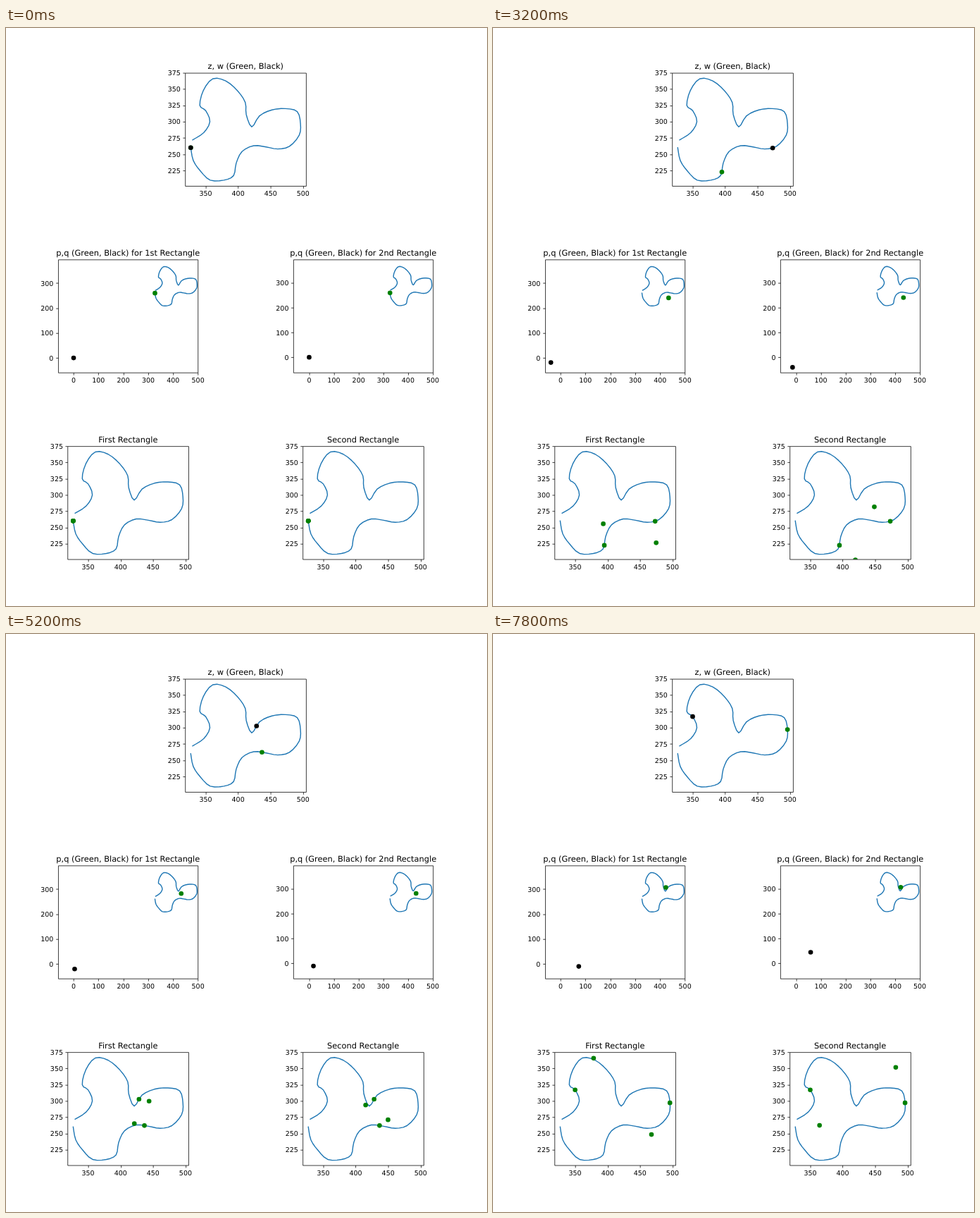
Recreate the animation shown at these times as an HTML page. Size 683x820 px, loop 8000 ms.

```html
<!DOCTYPE html>
<html lang="en">
<head>
<meta charset="utf-8">
<title>Rectangles on a curve</title>
<style>
  html, body { margin: 0; width: 100%; height: 100%; overflow: hidden; background: #fff; }
  svg { display: block; width: 683px; height: 820px; }
  text { font: 10px "DejaVu Sans", sans-serif; text-anchor: middle; text-rendering: geometricPrecision; }
  text.title { font-size: 12px; }
  text.left { text-anchor: end; }
  .axis { fill: none; stroke: #000; stroke-width: .8; }
  .curve { fill: none; stroke: #1f77b4; stroke-width: 1.5; stroke-linejoin: round; stroke-linecap: square; }
</style>
</head>
<body>
<svg id="stage" viewBox="0 0 720 864" preserveAspectRatio="none"></svg>
<script>
const STEP_MS = 200, STEPS = 40;
const GREEN = '#008000', BLACK = '#000';
const stage = document.getElementById('stage');

// Key points of the hand-drawn curve; a spline puts STRIDE steps between neighbours.
const STRIDE = 3;
const keys = [
  [327, 260], [331, 240], [342, 224], [357, 210], [378, 210], [393, 217],
  [397, 236], [406, 254], [424, 263], [443, 261], [461, 258], [479, 262],
  [494, 279], [496, 297], [491, 315.5], [473, 320], [452, 318], [433, 309],
  [421, 292], [412.5, 311], [411, 329.5], [399, 347.5], [381, 362.5], [361, 366],
  [346.5, 348], [341, 325], [350, 317], [356.5, 300], [347, 283], [330, 272]
];

// Catmull-Rom spline, with the end keys repeated.
function pointAt(step) {
  const i = Math.min(Math.floor(step / STRIDE), keys.length - 2), t = step / STRIDE - i;
  const key = j => keys[Math.max(0, Math.min(keys.length - 1, j))];
  return [0, 1].map(axis => {
    const [a, b, c, d] = [-1, 0, 1, 2].map(j => key(i + j)[axis]);
    return b + t / 2 * (c - a + t * (2 * a - 5 * b + 4 * c - d + t * (3 * (b - c) + d - a)));
  });
}
const points = Array.from({ length: (keys.length - 1) * STRIDE + 1 }, (_, k) => pointAt(k));

function add(parent, tag, attrs, text) {
  const el = document.createElementNS('http://www.w3.org/2000/svg', tag);
  for (const key in attrs) el.setAttribute(key, attrs[key]);
  if (text !== undefined) el.textContent = text;
  parent.appendChild(el);
  return el;
}

const range = (from, to, step) =>
  Array.from({ length: (to - from) / step + 1 }, (_, i) => from + i * step);
const snap = v => Math.round(v) + .5;

const HEIGHT = 168.9;
const rowTop = row => 67.2 + 279 * row;

// ox, oy: position of the data origin. Returns a function that places the dots.
function panel({ title, left, top, width, scale, ox, oy, xTicks, yTicks, colors }) {
  const right = left + width, bottom = top + HEIGHT;
  const X = x => ox + x * scale, Y = y => oy - y * scale;
  const id = 'clip' + stage.childElementCount;
  add(add(stage, 'clipPath', { id }), 'rect', { x: left, y: top, width, height: HEIGHT });

  const plot = add(stage, 'g', { 'clip-path': `url(#${id})` });
  add(plot, 'polyline', { class: 'curve', points: points.map(([x, y]) => [X(x), Y(y)]).join(' ') });
  const dots = colors.map(fill => add(plot, 'circle', { r: 3.5, fill }));

  const l = snap(left), r = snap(right), t = snap(top), b = snap(bottom);
  let d = `M${l} ${t}H${r}V${b}H${l}Z`;
  for (const x of xTicks) {
    d += `M${snap(X(x))} ${b}v3.5`;
    add(stage, 'text', { x: X(x), y: bottom + 14.6 }, x);
  }
  for (const y of yTicks) {
    d += `M${l} ${snap(Y(y))}h-3.5`;
    add(stage, 'text', { class: 'left', x: left - 7, y: Y(y) + 3.8 }, y);
  }
  add(stage, 'path', { class: 'axis', d });
  add(stage, 'text', { class: 'title', x: left + width / 2, y: top - 6 }, title);

  return positions => positions.forEach(([x, y], i) => {
    dots[i].setAttribute('cx', X(x));
    dots[i].setAttribute('cy', Y(y));
  });
}

function closeUp(title, left, row, colors) {
  const scale = .972, top = rowTop(row);
  return panel({
    title, left, top, colors, scale, width: 180.7,
    ox: left - 318.55 * scale, oy: top + HEIGHT + 201.1 * scale,
    xTicks: range(350, 500, 50), yTicks: range(225, 375, 25)
  });
}
const overview = (title, left, width, scale, ox, oy) => panel({
  title, left, width, scale, ox, oy, top: rowTop(1), colors: [GREEN, BLACK],
  xTicks: range(0, 500, 100), yTicks: range(0, 300, 100)
});

const four = Array(4).fill(GREEN);
const showPair = closeUp('z, w (Green, Black)', 268.3, 0, [GREEN, BLACK]);
const showFirstPQ = overview('p,q (Green, Black) for 1st Rectangle', 78, 209.4, .3724, 101.2, 493.2);
const showSecondPQ = overview('p,q (Green, Black) for 2nd Rectangle', 430.2, 208.9, .37, 453.8, 492.2);
const showFirst = closeUp('First Rectangle', 92.35, 2, four);
const showSecond = closeUp('Second Rectangle', 444.3, 2, four);

const plus = (a, b, k = 1) => [a[0] + k * b[0], a[1] + k * b[1]];
const half = ([x, y]) => [x / 2, y / 2];
// Turns a vector by 45 degrees, counterclockwise for sign 1.
const turn = ([x, y], sign) => [(x - sign * y) * Math.SQRT1_2, (sign * x + y) * Math.SQRT1_2];

// w runs along the curve twice as fast as z; each rectangle has z-w as a diagonal.
function draw(n) {
  const z = points[n], w = points[2 * n];
  const p = half(plus(z, w)), q = half(plus(z, w, -1));
  const q1 = turn(q, -1), q2 = turn(q, 1);
  showPair([z, w]);
  showFirstPQ([p, q]);
  showSecondPQ([p, q2]);
  showFirst([z, w, plus(p, q1), plus(p, q1, -1)]);
  showSecond([z, w, plus(p, q2), plus(p, q2, -1)]);
}

function tick() {
  draw(Math.floor(performance.now() / STEP_MS) % STEPS);
  requestAnimationFrame(tick);
}
tick();
</script>
</body>
</html>
```
